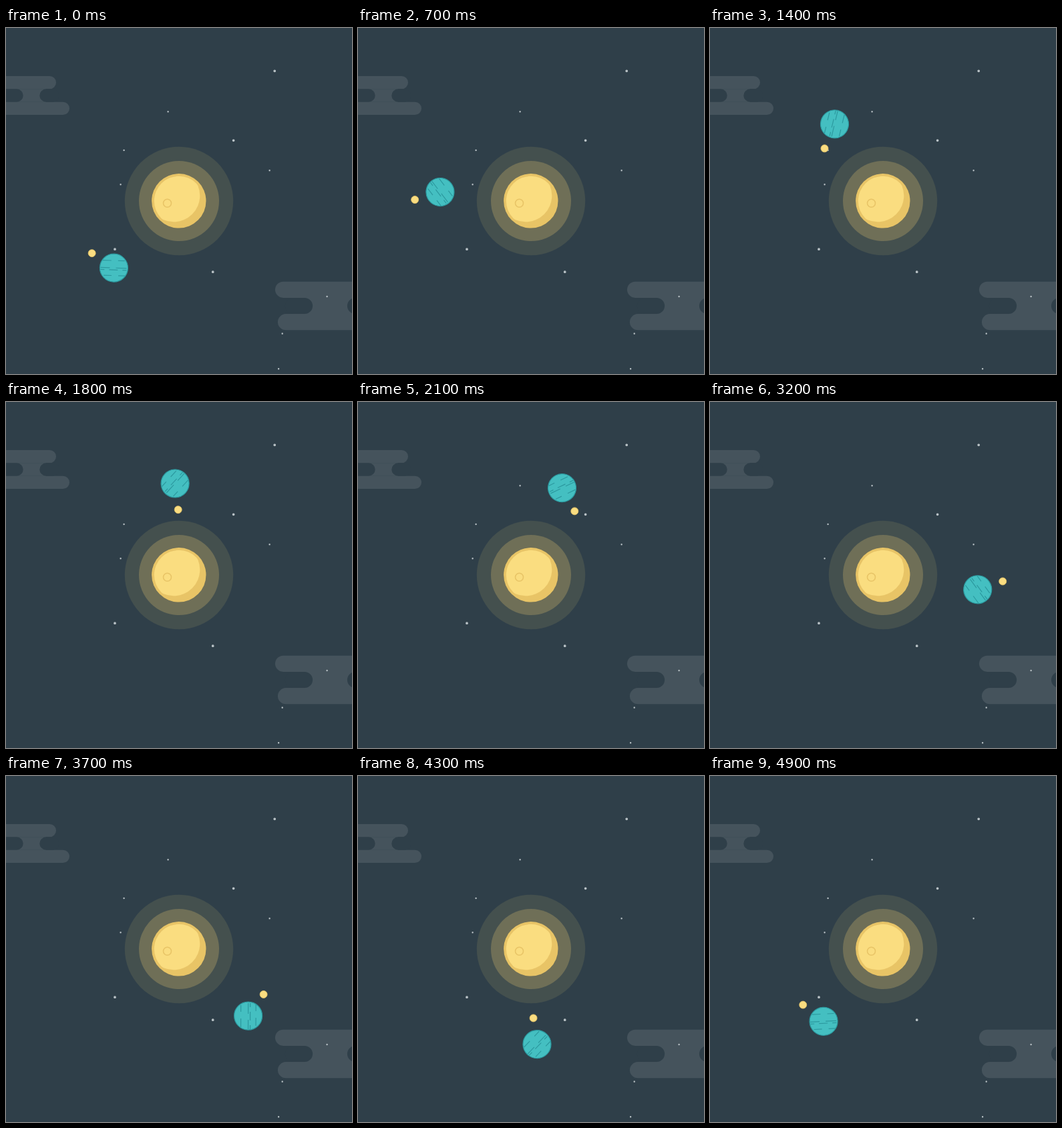
Write an HTML page that moves like this. It is 518 px wide and 518 px high and loops after 5 s.

```html
<!DOCTYPE html>
<html lang="en">
<head>
<meta charset="utf-8">
<title>Orbit</title>
<style>
  :root { --sky: #2f3f49; --cloud: #45535c; --gold: #e8c466; --light: #fadd80; --teal: #2c999f; }
  html, body { margin: 0; height: 100%; overflow: hidden; background: var(--sky); }
  svg { display: block; width: 100%; height: 100%; }
  path { fill: none; }
  .round { stroke-linecap: round; }
</style>
</head>
<body>
<svg viewBox="0 0 518 518">
  <defs>
    <clipPath id="disc"><circle cx="258.8" cy="258.8" r="37"/></clipPath>
  </defs>

  <!-- Each cloud: a neck, two round bars, and gaps cut in the sky colour -->
  <g stroke-width="19.4">
    <path stroke="var(--cloud)" d="M0 101H60"/>
    <path stroke="var(--cloud)" class="round" d="M0 81.6H65.3M0 120.4H85.3"/>
    <path stroke="var(--sky)" class="round" d="M0 101H16M60 101H70"/>
  </g>
  <g stroke-width="24.2">
    <path stroke="var(--cloud)" d="M518 416H447"/>
    <path stroke="var(--cloud)" class="round" d="M518 391.8H415M518 440.2H419"/>
    <path stroke="var(--sky)" class="round" d="M430 416H447M523 416H530"/>
  </g>

  <circle cx="259" cy="259" r="81.2" fill="#44504e"/>
  <circle cx="259" cy="259" r="60" fill="#6f6f57"/>
  <circle cx="258.8" cy="258.8" r="40.7" fill="var(--gold)"/>
  <circle cx="251" cy="251" r="39.3" fill="var(--light)" clip-path="url(#disc)"/>
  <circle cx="241.5" cy="262.3" r="6" fill="none" stroke="var(--gold)" stroke-width="1.6"/>

  <g class="round" stroke="#b9c2c6">
    <path stroke-width="3.8" d="M402.2 64.3h0M340.6 168.3h0M163 331.2h0M309.7 365.2h0"/>
    <path stroke-width="2.4" d="M242.6 125.3h0M176.6 183h0M394.6 213.3h0M171.6 234.3h0M480.6 402h0M413.7 457.5h0M408.1 510.2h0"/>
  </g>

  <g id="planet" stroke="var(--teal)" stroke-width="1.2">
    <circle r="21" fill="#44bfc1"/>
    <path d="M-17-11H-4M6-11H16M-20 0H-6M3 0H19M-20 3H-14M-7 3H6M13 3H19M-15 11.5H-3M7 11.5H17"/>
  </g>
  <circle id="moon" r="5.5" fill="var(--light)" stroke="var(--gold)" stroke-width=".8"/>
</svg>
<script>
  const LOOP = 5000, STEP = 100;
  const SPEED = 360 / 4967; // degrees per ms
  const planet = document.getElementById("planet");
  const moon = document.getElementById("moon");

  function around([x, y], radius, degrees) {
    const a = degrees * Math.PI / 180;
    return [x + radius * Math.cos(a), y + radius * Math.sin(a)];
  }

  function draw(now) {
    const time = Math.floor((now + 1) % LOOP / STEP) * STEP;
    const turn = time * SPEED;
    const home = around([262, 261.7], 140, 135.9 + turn);
    planet.setAttribute("transform", `translate(${home}) rotate(${2 + turn})`);
    moon.setAttribute("transform", `translate(${around(home, 39.5, 213.8 - turn)})`);
    requestAnimationFrame(draw);
  }
  draw(0);
</script>
</body>
</html>
```
